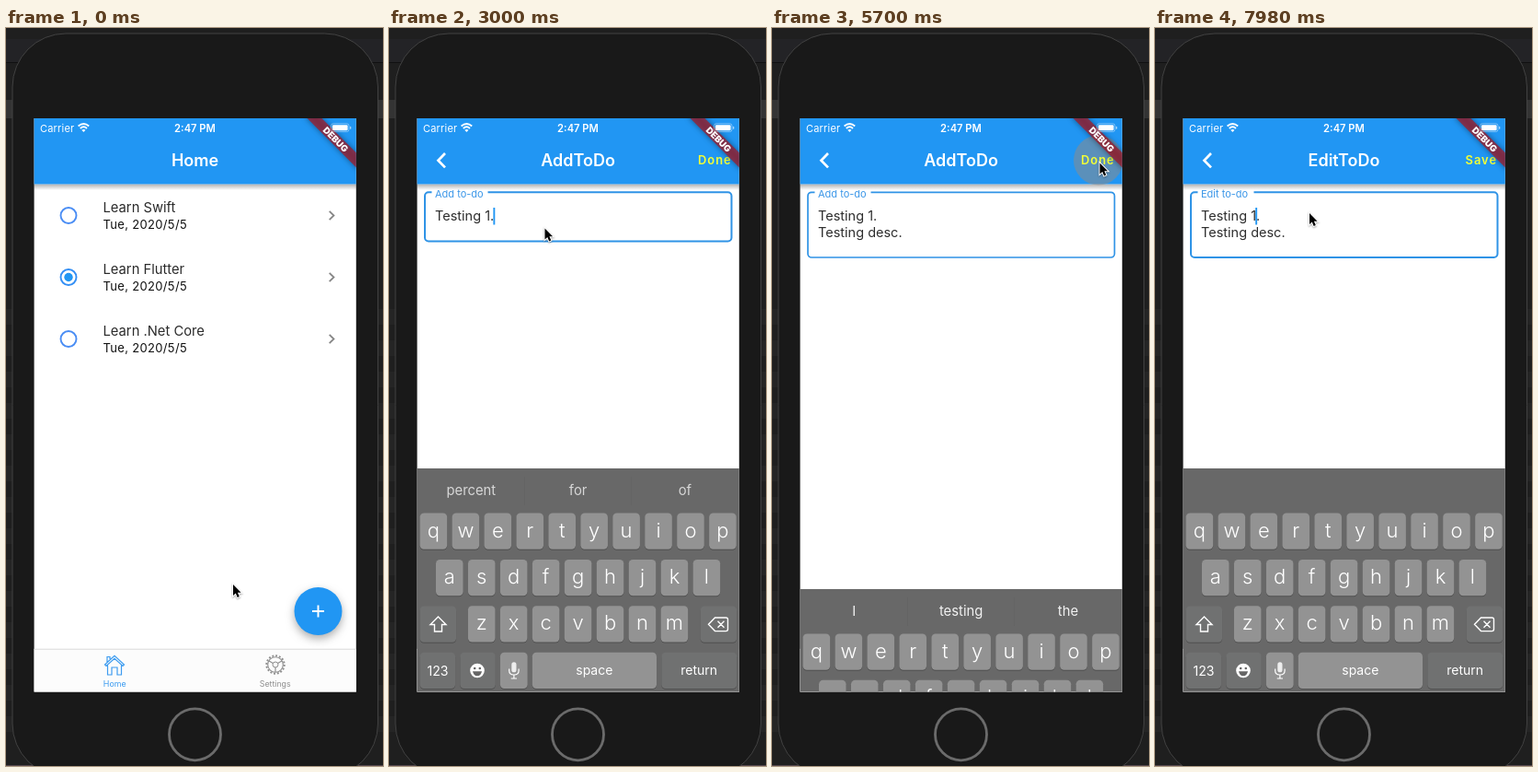
Animation of 410 by 801 pixels, one loop 8000 ms. Source, as an HTML page with a canvas:

```html
<!DOCTYPE html>
<html lang="en">
<head>
<meta charset="utf-8">
<title>To-do app demo</title>
<style>
  html, body { margin: 0; width: 100%; height: 100%; overflow: hidden; background: #1a1a1a; }
  canvas { display: block; width: 410px; height: 801px; }
</style>
</head>
<body>
<canvas id="stage"></canvas>
<script>
const LOOP = 8000;
const SCREEN = { x: 30.6, y: 98, w: 350.2, h: 622.5 };
const BLUE = '#2196f3';
const KEYBOARD_TOP = 478, KEYBOARD_HEIGHT = 243;

const canvas = document.getElementById('stage');
const ctx = canvas.getContext('2d');
const ratio = window.devicePixelRatio || 1;
canvas.width = 410 * ratio;
canvas.height = 801 * ratio;

// Timing helpers
const clamp = v => Math.min(1, Math.max(0, v));
const progress = (t, start, length) => clamp((t - start) / length);
const easeOut = p => 1 - (1 - p) ** 4;
const easeInOut = p => p * p * (3 - 2 * p);
const spring = ms => ms <= 0 ? 0 : 1 - (1 + ms * 0.021) * Math.exp(-ms * 0.021);

// Drawing helpers
function layer(draw, x = 0, y = 0) {
  ctx.save();
  ctx.translate(x, y);
  draw();
  ctx.restore();
}
function box(x, y, w, h, color) {
  ctx.fillStyle = color;
  ctx.fillRect(x, y, w, h);
}
// Full-width strip of the screen
const band = (y, h, color) => box(30, y, 352, h, color);
function rounded(x, y, w, h, r, color) {
  ctx.beginPath();
  ctx.roundRect(x, y, w, h, r);
  ctx.fillStyle = color;
  ctx.fill();
}
function disc(x, y, r, color) {
  ctx.beginPath();
  ctx.arc(x, y, r, 0, 7);
  ctx.fillStyle = color;
  ctx.fill();
}
function ring(x, y, r, color, width) {
  ctx.beginPath();
  ctx.arc(x, y, r, 0, 7);
  ctx.strokeStyle = color;
  ctx.lineWidth = width;
  ctx.stroke();
}
function line(path, color, width) {
  ctx.strokeStyle = color;
  ctx.lineWidth = width;
  ctx.stroke(new Path2D(path));
}
function setFont(size, weight = 400, spacing = 0) {
  ctx.font = `${weight} ${size}px Inter, "Noto Sans", sans-serif`;
  ctx.letterSpacing = spacing + 'px';
}
function text(str, x, y, size, color, { weight, align = 'left', spacing } = {}) {
  setFont(size, weight, spacing);
  ctx.textAlign = align;
  ctx.fillStyle = color;
  ctx.fillText(str, x, y);
}

// Script of the session
const TIMES = {
  pushAdd: 1000, focusAdd: 1650, newline: 3480, done: 5560, blurAdd: 5600,
  popAdd: 5740, tapRow: 6180, pushEdit: 6230, focusEdit: 6960
};
const LINES = ['Testing 1.', 'Testing desc.'];
const keyTimes = [i => 2040 + 90 * i, i => 3700 + 110 * i];

const pointerMoves = [ // start, end, x, y
  [0, 0, 247, 604], [60, 760, 340, 633], [1100, 1600, 169.5, 217.5],
  [5120, 5460, 356.5, 146.5], [5800, 6140, 228, 202], [6660, 6900, 168, 201]
];
const suggestions = [
  [0], [2180, '“Te”', 'Test', 'The'], [2420, '“Testi”', 'Testing', 'Testify'],
  [2660, 'the', 'for', 'it'], [2880, 'percent', 'for', 'of'], [3560, 'I', 'The', 'I’m'],
  [3900, '“Tes”', 'Test', 'Testing'], [4480, 'the', 'for', 'it'],
  [4700, '“de”', 'default', 'description'], [4830, '“desc”', 'description', 'describe'],
  [5130, 'I', 'testing', 'the'], [6300]
];

function typedLines(t) {
  const typed = LINES.map((str, n) => [...str].filter((c, i) => t >= keyTimes[n](i)).join(''));
  return t < TIMES.newline ? typed.slice(0, 1) : typed;
}

function lastKeyTime(t) {
  let last = TIMES.focusAdd;
  LINES.forEach((str, n) => [...str].forEach((c, i) => {
    if (keyTimes[n](i) <= t) last = keyTimes[n](i);
  }));
  return last;
}

// Pages
function appBar(title, action, press = 0) {
  const shade = ctx.createLinearGradient(0, 169.5, 0, 176);
  shade.addColorStop(0, 'rgba(0,0,0,.3)');
  shade.addColorStop(1, 'rgba(0,0,0,0)');
  band(169.5, 6.5, shade);
  band(98, 71.5, BLUE);
  text(title, 205.5, 150.3, 18, '#fff', { weight: 600, align: 'center' });
  if (!action) return;
  line('M61 136L53.5 143.7l7.5 7.7', '#fff', 2.7);
  disc(355, 143.5, 27, `rgba(150,140,130,${0.5 * press})`);
  text(action, action === 'Done' ? 336 : 337.5, 148, 12.9, '#f3ff35', { weight: 600, spacing: 1 });
}

function todoRow(title, y, checked) {
  ring(68, y, 8.5, checked ? '#348ff5' : '#4a8df4', 1.9);
  if (checked) disc(68, y, 4.7, BLUE);
  text(title, 105.5, y - 3.7, 14.75, '#2b2b2b');
  text('Tue, 2020/5/5', 105.5, y + 14.3, 13, '#111', { spacing: 0.33 });
  line(`M351.7 ${y - 4.6}l4.8 4.6l-4.8 4.6`, '#858585', 1.8);
}

function homePage(t) {
  band(98, 623, '#fff');
  const rows = ['Learn Swift', 'Learn Flutter', 'Learn .Net Core'];
  if (t >= TIMES.popAdd) rows.unshift(LINES[0]);
  if (t >= TIMES.tapRow && t < TIMES.pushEdit + 400) band(170, 67, '#e4e4e4');
  rows.forEach((title, i) => todoRow(title, 203.5 + i * 67, title === 'Learn Flutter'));
  appBar('Home');
  layer(() => {
    ctx.shadowColor = 'rgba(0,0,0,.32)';
    ctx.shadowBlur = 10 * ratio;
    ctx.shadowOffsetY = 4 * ratio;
    disc(339.5, 633, 26, BLUE);
  });
  const press = progress(t, 930, 60) * (1 - progress(t, 1050, 200));
  disc(339.5, 633, 26, `rgba(255,255,255,${0.2 * press})`);
  line('M333 633h13M339.5 626.5v13', '#fff', 1.9);
}

function field(label, lines, { focus, border, width, caretOn, caretLine }) {
  const empty = lines.join('') === '';
  const lift = empty ? focus : 1;
  const bottom = lines.length > 1 ? 249 : 231.5;
  ctx.beginPath();
  ctx.roundRect(39, 178.3, 333.5, bottom - 178.3, 4);
  ctx.strokeStyle = border;
  ctx.lineWidth = width;
  ctx.stroke();
  if (lift > 0) box(46.5, 176, 61 * lift, 5, '#fff');
  text(label, 50, 209 - 25 * lift, 14.4 - 3.4 * lift, focus ? '#3c97e8' : '#858585');
  if (empty && lift === 1) text('Add new to-do.', 50, 209, 14.6, '#858585');
  lines.forEach((str, i) => text(str, 50, 209 + i * 18, 14.5, '#2e2e2e'));
  if (!caretOn) return;
  const atEnd = caretLine === undefined;
  const row = atEnd ? lines.length - 1 : caretLine;
  setFont(14.5);
  box(49.2 + ctx.measureText(atEnd ? lines[row] : 'Testing 1').width, 195 + row * 18, 1.9, 18.5, BLUE);
}

function addPage(t) {
  band(98, 623, '#fff');
  const focus = progress(t, TIMES.focusAdd, 180);
  const focused = t >= TIMES.focusAdd && t < TIMES.blurAdd;
  field('Add to-do', typedLines(t), {
    focus,
    border: focus ? '#2f93e6' : '#8a8a8a',
    width: focused ? 2 : focus ? 1.7 : 1,
    caretOn: focused && (t - lastKeyTime(t)) % 1000 < 550
  });
  appBar('AddToDo', 'Done', progress(t, TIMES.done - 20, 80) * (1 - progress(t, 5740, 200)));
}

function editPage(t) {
  band(98, 623, '#fff');
  const focused = t >= TIMES.focusEdit;
  field('Edit to-do', LINES, {
    focus: focused ? 1 : 0,
    border: focused ? '#2f93e6' : '#8a8a8a',
    width: focused ? 2 : 1,
    caretOn: focused && (t - TIMES.focusEdit) % 1000 < 550,
    caretLine: 0
  });
  appBar('EditToDo', 'Save');
}

function pages(t) {
  const editing = t >= TIMES.pushEdit;
  const shown = editing
    ? easeOut(progress(t, TIMES.pushEdit, 400))
    : easeOut(progress(t, TIMES.pushAdd, 400)) - easeOut(progress(t, TIMES.popAdd, 400));
  if (shown < 1) layer(() => homePage(t), -350 / 3 * shown);
  if (shown <= 0) return;
  layer(() => {
    if (shown < 1) {
      const edge = ctx.createLinearGradient(13, 0, 31, 0);
      edge.addColorStop(0, 'rgba(0,0,0,0)');
      edge.addColorStop(1, 'rgba(0,0,0,.08)');
      box(13, 98, 18, 623, edge);
    }
    (editing ? editPage : addPage)(t);
  }, 350 * (1 - shown));
}

function tabBar() {
  band(674, 47, '#fcfcfc');
  band(673.7, 1, '#d9d9d9');
  layer(() => {
    line('M-10.5 0L0-9.8L10.5 0L9 1.5L0-6.8L-9 1.5ZM-7.5 0V11H-3V3H3V11H7.5V0M-8-3V-8.5H-5V-6', '#3d9cf0', 1.2);
  }, 118, 691);
  layer(() => {
    ring(0, 0, 8.3, '#8f8f8f', 1.1);
    ring(0, 0, 3, '#8f8f8f', 1);
    for (let i = 0; i < 3; i++) {
      ctx.rotate(Math.PI * 2 / 3);
      line('M0 3V8', '#8f8f8f', 1.2);
    }
    ctx.setLineDash([1.9, 1.9]);
    ring(0, 0, 9.7, '#8f8f8f', 2);
  }, 293, 691);
  text('Home', 118.3, 714.7, 8.9, '#3d9cf0', { align: 'center' });
  text('Settings', 292.7, 714.7, 8.8, '#8f8f8f', { align: 'center' });
}

// Keyboard
function key(x, y, w, color = '#939393') {
  rounded(x, y + 1, w, 39.3, 4.5, '#4f4f4f');
  rounded(x, y, w, 39.3, 4.5, color);
}

function keyIcons() {
  line('M53.5 639L62 647.5H57.5V655H49.5V647.5H45Z', '#fff', 1.4);
  line('M347.5 647.3L354.5 640H366.5Q368.5 640 368.5 642V652.6Q368.5 654.6 366.5 654.6H354.5ZM357.5 643.7l7 7m0-7l-7 7', '#fff', 1.4);
  disc(96, 697.5, 7.8, '#fff');
  disc(93.2, 695, 1.3, '#666');
  disc(98.8, 695, 1.3, '#666');
  ctx.fillStyle = '#666';
  ctx.fill(new Path2D('M91 698.3H101Q100 703.3 96 703.3T91 698.3Z'));
  rounded(133.3, 688.3, 5.2, 11, 2.6, '#ededed');
  line('M130.7 695.5V697.5Q130.7 702 135.9 702T141.1 697.5V695.5M135.9 702V706M132.7 706H139', '#fff', 1.2);
}

function suggestionBar(t) {
  const [start, ...words] = suggestions.findLast(s => s[0] <= t);
  if (!words.length) return;
  box(147, 487, 1, 31, '#646464');
  box(263, 487, 1, 31, '#646464');
  ctx.globalAlpha = 0.2 + 0.8 * progress(t, start, 160);
  words.forEach((word, i) => text(word, 89.3 + i * 116.3, 507.3, 14.8, '#f2f2f2', { align: 'center' }));
  ctx.globalAlpha = 1;
}

function keyboard(t) {
  const raised = t < 6300
    ? spring(t - 1680) - spring(t - 5615)
    : spring(t - 7000);
  if (raised < 0.002) return;
  layer(() => {
    band(KEYBOARD_TOP, KEYBOARD_HEIGHT + 2, '#686868');
    suggestionBar(t);
    [['qwertyuiop', 33.6], ['asdfghjkl', 51], ['zxcvbnm', 85.9]].forEach(([letters, left], row) => {
      const y = 526.5 + row * 50.4;
      [...letters].forEach((letter, i) => {
        const x = left + i * 34.95;
        key(x, y, 29.6);
        text(letter, x + 14.8, 553 + row * 49.9, 22, '#fff', { weight: 300, align: 'center' });
      });
    });
    [[33.6, 627.5, 39.5], [338.7, 627.5, 39.5], [33.6, 677.8, 38.5], [77.3, 677.8, 38.5], [296.3, 677.8, 82]]
      .forEach(([x, y, w]) => key(x, y, w, '#707171'));
    key(120.9, 677.8, 29.8);
    key(155.8, 677.8, 135.2);
    text('123', 53, 702.6, 14.2, '#fff', { align: 'center' });
    text('space', 223.3, 702.2, 14, '#fff', { align: 'center' });
    text('return', 337.2, 702.2, 14, '#fff', { align: 'center' });
    keyIcons();
  }, 0, KEYBOARD_HEIGHT * (1 - raised));
}

// Overlays
function debugRibbon() {
  layer(() => {
    ctx.rotate(Math.PI / 4);
    ctx.shadowColor = 'rgba(0,0,0,.6)';
    ctx.shadowBlur = 6 * ratio;
    box(-40, 26.2, 80, 11.2, 'rgba(165,25,40,.72)');
    ctx.shadowColor = 'transparent';
    text('DEBUG', 0, 35.4, 9.8, '#fff', { weight: 900, align: 'center' });
  }, 381, 98.5);
}

function statusBar() {
  text('Carrier', 37, 112.5, 11, '#fff', { spacing: 0.2 });
  text('2:47 PM', 205.5, 112.5, 11.2, '#fff', { weight: 600, align: 'center' });
  line('M78.6 106.5Q84.4 101.3 90.2 106.5M80.8 109Q84.4 105.7 88 109', '#fff', 1.9);
  ctx.fillStyle = '#fff';
  ctx.fill(new Path2D('M82.3 110.8Q84.4 109.2 86.5 110.8L84.4 113Z'));
  ctx.beginPath();
  ctx.roundRect(353.5, 103.8, 19.5, 8.8, 2.4);
  ctx.strokeStyle = 'rgba(255,255,255,.5)';
  ctx.lineWidth = 0.8;
  ctx.stroke();
  rounded(354.9, 105.2, 16.7, 6, 1.3, '#fff');
  rounded(374, 106.8, 1.3, 3, 0.6, 'rgba(255,255,255,.6)');
}

function pointer(t) {
  let [, , x, y] = pointerMoves[0];
  for (const [start, end, toX, toY] of pointerMoves.slice(1)) {
    const p = easeInOut(progress(t, start, end - start));
    x += (toX - x) * p;
    y += (toY - y) * p;
  }
  layer(() => {
    const arrow = new Path2D('M0 0V12L2.8 9.5L4.7 14L6.8 13.1L4.9 8.8H8.6Z');
    ctx.shadowColor = 'rgba(0,0,0,.35)';
    ctx.shadowBlur = 2 * ratio;
    ctx.shadowOffsetY = ratio;
    ctx.strokeStyle = '#fff';
    ctx.lineWidth = 2;
    ctx.stroke(arrow);
    ctx.shadowColor = 'transparent';
    ctx.fillStyle = '#000';
    ctx.fill(arrow);
  }, x, y);
}

function phone() {
  box(0, 0, 410, 801, '#1f1f1f');
  box(0, 12, 410, 25, '#232326');
  box(0, 37, 410, 1, '#111');
  box(0, 78, 410, 20, '#343434');
  for (let y = 305; y < 780; y += 34) box(0, y, 410, 17, '#252525');
  box(0, 800, 410, 1, '#57484d');
  ctx.beginPath();
  ctx.roundRect(7, 6, 397.5, 807, 58);
  ctx.fillStyle = '#191919';
  ctx.fill();
  ctx.strokeStyle = '#424242';
  ctx.lineWidth = 1;
  ctx.stroke();
  ring(205.5, 766.8, 28, '#6b6b6b', 2.8);
}

function draw() {
  const t = performance.now() % LOOP;
  ctx.setTransform(ratio, 0, 0, ratio, 0, 0);
  phone();
  layer(() => {
    ctx.beginPath();
    ctx.rect(SCREEN.x, SCREEN.y, SCREEN.w, SCREEN.h);
    ctx.clip();
    pages(t);
    tabBar();
    keyboard(t);
    debugRibbon();
    statusBar();
  });
  pointer(t);
  requestAnimationFrame(draw);
}
draw();
</script>
</body>
</html>
```
